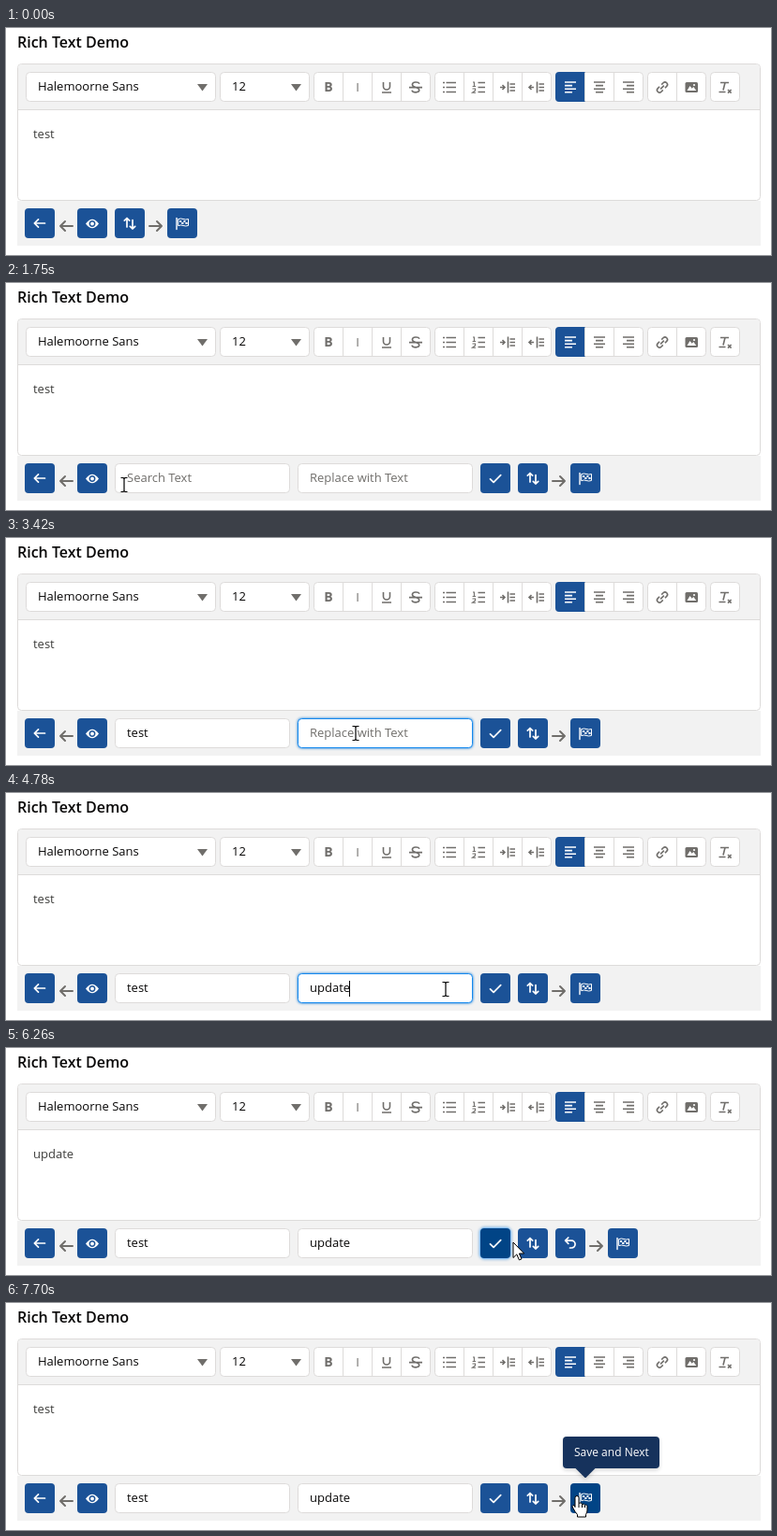
Write an HTML page that moves like this. It is 816 px wide and 243 px high and loops after 8000 ms.

```html
<!DOCTYPE html>
<html lang="en">
<head>
<meta charset="utf-8">
<title>Rich Text Demo</title>
<style>
  html, body { margin: 0; width: 100%; height: 100%; overflow: hidden; background: #fff; }
  svg { display: block; width: 816px; height: 243px; }
  text { font: 13px "Open Sans", sans-serif; fill: #080707; }
  .title { font-size: 16px; font-weight: 600; }
  .body { fill: #3e3e3c; }
  .hint { fill: #706e6b; }
  .tip { font-size: 12px; font-weight: 500; fill: #fff; }
  .native { font-size: 11.35px; fill: #444; }
  .box { fill: #fff; stroke: #dddbda; }
  .rule { fill: none; stroke: #dddbda; }
  .line { fill: none; stroke: #706e6b; stroke-width: 1.6; }
  .solid { fill: #706e6b; }
  .arrow { fill: none; stroke: #706e6b; stroke-width: 2; stroke-linecap: round; stroke-linejoin: round; }
  .icon { fill: none; stroke: #fff; stroke-width: 1.7; stroke-linecap: round; stroke-linejoin: round; }
  .glow { filter: drop-shadow(0 0 1.5px #0070d2); }
  .shade { filter: drop-shadow(0 2px 2px rgba(0, 0, 0, .16)); }
</style>
</head>
<body>
<svg viewBox="0 0 816 243" xmlns="http://www.w3.org/2000/svg">
  <g id="frame"></g>
  <g id="live"></g>
</svg>
<script>
const LOOP = 8000;
const BLUE = '#1b5297', DARK = '#014486', NAVY = '#16325c';

const path = (d, cls, extra = '') => `<path d="${d}" class="${cls}" ${extra}/>`;
const label = (x, y, s, cls = '') => `<text x="${x}" y="${y}" class="${cls}">${s}</text>`;
const rect = (x, y, w, h, r, attrs) =>
  `<rect x="${x}" y="${y}" width="${w}" height="${h}" rx="${r}" ${attrs}/>`;
const move = (x, y, s) => `<g transform="translate(${x} ${y})">${s}</g>`;

// ---- fixed frame and toolbar; tool icons are centred on 0,0 ----
const rows = (ys, x1, x2) => ys.map(y => `M${x1} ${y}H${x2}`).join('');
const aligned = shift => [12, 8, 12, 8].map((w, i) =>
  `M${(w - 12) * shift - 6} ${i * 3.6 - 5}h${w}`).join('');
const indent = head => path(`M-8 .5h5${head}`, 'line', 'stroke-width="1.4"') +
  path('M.5-5.5v12' + rows([-3, .5, 4], 2.5, 8), 'line');
const glyph = (s, style) =>
  `<text y="5" text-anchor="middle" style="fill:#706e6b;${style}">${s}</text>`;

const tools = [
  [328, [
    glyph('B', 'font-weight:700;font-size:14px'),
    glyph('I', 'font:italic 700 15px "Liberation Serif",serif'),
    path('M-3.5-5v4.5a3.5 3.5 0 0 0 7 0v-4.5M-5 6h10', 'line'),
    path('M4-3.2C3-5.8-3.6-5.6-3.6-2.6C-3.6-1-2 0 0 .6C2.5 1.4 3.8 2 3.8 3.6C3.8 6.6-3.4 6.6-4 3.6M-7 .6h14', 'line')
  ]],
  [457, [
    path(rows([-4.5, .5, 5.5], -3.5, 7) + rows([-4.5, .5, 5.5], -7, -5), 'line'),
    path(rows([-4.5, .5, 5.5], -.5, 7), 'line') +
      path('M-6-5h1.4v4.5M-6.4-.5h3.4M-6.5 2h3v2l-3 2.2h3.5', 'line', 'style="stroke-width:1.1"'),
    indent('M-5.5-2l2.5 2.5l-2.5 2.5'),
    indent('M-5.5-2l-2.5 2.5l2.5 2.5')
  ]],
  [586, [
    path(aligned(0), 'line', 'style="stroke:#fff"'),
    path(aligned(-.5), 'line'),
    path(aligned(-1), 'line')
  ]],
  [684, [
    `<g transform="translate(0 .5) rotate(-45)">${path('M-1.5-2.6h-2.6a2.6 2.6 0 0 0 0 5.2h2.6M1.5-2.6h2.6a2.6 2.6 0 0 1 0 5.2h-2.6M-2.6 0h5.2', 'line')}</g>`,
    rect(-6.5, -5, 13.5, 11, 1.5, 'class="solid"') +
      path('M-4.5 4l3-5l2.2 2.8l1.6-1.8l3 4z', '', 'fill="#fff"') +
      '<circle cx="3" cy="-2" r="1.1" fill="#fff"/>'
  ]],
  [751, [
    path('M-5-4.5h9M0-4.5l-2 8M-6.5 5.5h7M3 3l3.6 3.6M6.6 3l-3.6 3.6', 'line')
  ]]
];

function group([x, icons]) {
  const w = icons.length * 31 + 1;
  const cells = icons.map((icon, i) => {
    const left = x + i * 31;
    const split = i ? path(`M${left + .5} 48v30`, 'rule') : '';
    const active = x === 586 && !i
      ? path(`M617.5 47H590a4 4 0 0 0-4 4v24a4 4 0 0 0 4 4h27.5z`, '', `fill="${BLUE}"`) : '';
    return split + active + move(left + 16, 63, icon);
  });
  return rect(x + .5, 47.5, w - 1, 31, 4, 'class="box"') + cells.join('');
}

const picker = (x, w, tx, s) => rect(x + .5, 47.5, w - 1, 31, 4, 'class="box"') +
  label(tx, 67, s) + path(`M${x + w - 20} 60h11l-5.5 7.5z`, 'solid');

document.getElementById('frame').innerHTML =
  label(12, 21, 'Rich Text Demo', 'title') +
  rect(12, 185, 793, 48, 0, 'fill="#f2f2f2"') +
  rect(12.5, 38.5, 792, 146, 4, 'class="box"') +
  path('M13 87V43a4 4 0 0 1 4-4h783a4 4 0 0 1 4 4v44z', '', 'fill="#f2f2f2"') +
  path('M13 87.5h791', 'rule') +
  picker(21, 203, 34, 'Halemoorne Sans') +
  picker(228, 96, 241, '12') +
  tools.map(group).join('');

// ---- timeline ----
// pointer poses: time, x, y; no position means hidden
const poses = [
  [0], [100, 302, 196], [210, 274, 198], [330, 240, 200], [440, 206, 203], [550, 170, 205],
  [660, 136, 205], [770, 107, 205], [880, 100, 204], [1420, 104, 206], [1530, 111, 208],
  [1640, 126, 216], [1760, 138, 220], [1870, 146, 222], [1980, 150, 222], [2210],
  [2650, 373, 214], [2870, 373, 209], [3970], [4780, 469, 210], [4880, 493, 210],
  [4990, 528, 211], [5090, 552, 212], [5190, 556, 212], [5300, 543, 212], [5400, 528, 211],
  [5500, 522, 211], [6160, 532, 209], [6260, 541, 208], [6380, 554, 206], [6500, 560, 205],
  [6700, 581, 206], [6810, 592, 206], [6920, 604, 206], [7030, 609, 207]
];
const tips = [
  [880, 1530, 'eye'], [5190, 5300, 'swap'], [5500, 5730, 'check'],
  [6380, 6700, 'swap'], [7030, 7580, 'undo'], [7700, LOOP, 'flag']
];
const tipText = {
  eye: ['Search and Replace', 133], swap: ['Upper and Lower Case', 153],
  check: ['Replace Text', 96], undo: ['Revert Last Change', 130], flag: ['Save and Next', 103]
};
const searchKeys = [[0, ''], [2210, 't'], [2320, 'te'], [2430, 'tes'], [2540, 'test']];
const replaceKeys = [[0, ''], [3970, 'u'], [4080, 'upd'], [4190, 'upda'], [4290, 'update']];

const last = (list, t) => list.filter(e => e[0] <= t).pop();
const within = (t, a, b) => t >= a && t < b;

// ---- footer parts ----
const icons = {
  back: path('M-5.5 0h11M-1.5-4.2L-5.7 0l4.2 4.2', 'icon'),
  eye: path('M-7 .5Q0-9 7 .5Q0 10-7 .5z', '', 'fill="#fff"') +
    `<circle cy=".5" r="2.7" fill="none" stroke="${BLUE}" stroke-width="1.5"/>`,
  swap: path('M-3 4v-9.5M-5.7-2.8L-3-5.5l2.7 2.7M3-3.5v9.5M.3 3.3L3 6l2.7-2.7', 'icon'),
  check: path('M-5.5.8l3.6 3.6l7.6-7.8', 'icon'),
  undo: path('M-2.2-6L-5.4-2.8l3.2 3.2M-5-2.8H1.2a3.9 3.9 0 0 1 0 7.8H-.5', 'icon'),
  flag: path('M-6-5.5v12', 'icon', 'style="stroke-width:1.4"') +
    path('M-4-4.5q2.5-1 5 0t5.5 0v7q-3 1-5.500 0t-5 0z', 'icon', 'style="stroke-width:1"') +
    path('M-3-3h2.2v2H-3zM1.400-3h2v2h-2zM-.8-1h2.200v2h-2.200zM3.400-1h2.200v2H3.400z', '', 'fill="#fff"')
};

const pen = document.createElement('canvas').getContext('2d');
function textWidth(s) {
  pen.font = '13px "Open Sans", sans-serif';
  return pen.measureText(s).width;
}

function button({ id, x }, hover, focus) {
  const ring = focus ? rect(x - .5, 192.5, 33, 33, 4.5, 'class="glow" fill="none" stroke="#8fc3f5"') : '';
  return ring + rect(x, 193, 32, 32, 4, `fill="${hover || focus ? DARK : BLUE}"`) +
    move(x + 16, 209, icons[id]);
}

function field(x, value, hint, focus, caret) {
  const at = Math.round(x + 13 + textWidth(value)) - .5;
  return rect(x + .5, 193.5, 186, 31, 4, focus ? 'class="glow" fill="#fff" stroke="#1589ee"' : 'class="box"') +
    label(x + 13, 213, value || hint, value ? '' : 'hint') +
    (caret ? path(`M${at} 201v17`, '', 'stroke="#000"') : '');
}

function bubble(x, id) {
  const [s, w] = tipText[id];
  return `<g class="shade" fill="${NAVY}">${rect(x - 24, 143, w, 34, 4, '')}
    <path d="M${x - 11} 176.500l10 10q1 1 2 0l10-10z"/></g>` + label(x - 12, 164, s, 'tip');
}

const native = (x, y, w, s) =>
  rect(x + .5, y + .5, w - 1, 24, 0, 'fill="#fff" stroke="#555"') + label(x + 8, y + 17, s, 'native');

const pointers = {
  arrow: path('M0 0v16.500l3.800-3.600l2.600 6l2.600-1.100l-2.600-5.800h5.300z', '', 'fill="#fff" stroke="#000"'),
  beam: path('M-3.500-7.500h2.500l1 1l1-1h2.500M0-6.500v13M-3.500 7.500h2.500l1-1l1 1h2.500', '',
    'fill="none" stroke="#000" stroke-width="1.200"'),
  hand: path('M-2 1.500a2 2 0 0 1 4 0V7.500a2 1.600 0 0 1 3.500 1a2 1.600 0 0 1 3 .8a1.600 1.600 0 0 1 2.500 1.400V15q0 2-1.500 4.500V22h-9v-2.500q-2-2-5-7.500q-1-2 .5-2.600q1-.4 2 2.100z',
    '', 'fill="#fff" stroke="#000" stroke-linejoin="round"') +
    path('M2 7.500V12M5.500 8.500V12M8.500 9.300V12', '', 'stroke="#000"')
};

function scene(t) {
  const open = t >= 1310;
  const undo = within(t, 5830, 7580);
  const [, px, py] = last(poses, t);
  const over = (x, w) => px >= x && px < x + w && py >= 193 && py < 225;

  const base = open ? 546 : 116;
  const end = base + (undo ? 96 : 56);
  const buttons = [{ id: 'back', x: 20 }, { id: 'eye', x: 76 }, { id: 'swap', x: base }, { id: 'flag', x: end }];
  if (open) buttons.push({ id: 'check', x: 506 });
  if (undo) buttons.push({ id: 'undo', x: 586 });

  const hovered = buttons.find(b => over(b.x, 32));
  const checkFocus = within(t, 5730, 7580);
  const searchFocus = within(t, 2090, 2990);
  const replaceFocus = within(t, 2990, 5730);
  const caretOff = within(t, 3420, 3970) || within(t, 4880, 5400);

  let out = label(29, 118, within(t, 5730, 7580) ? 'update' : 'test', 'body');
  out += path('M58 212h13M63 207l-5 5l5 5', 'arrow');
  out += path(`M${end - 19} 212h13m-5-5l5 5l-5 5`, 'arrow');
  if (open) {
    out += field(116, last(searchKeys, t)[1], 'Search Text', searchFocus, searchFocus);
    out += field(311, last(replaceKeys, t)[1], 'Replace with Text', replaceFocus, replaceFocus && !caretOff);
  }
  out += buttons.map(b => button(b, b === hovered, b.id === 'check' && checkFocus)).join('');

  const tip = tips.find(([a, b]) => within(t, a, b));
  if (tip) out += bubble(buttons.find(b => b.id === tip[2]).x + 16, tip[2]);
  if (within(t, 1090, 1310)) out += native(108, 218, 119, tipText.eye[0]);
  if (within(t, 7360, 7580)) out += native(617, 221, 118, tipText.undo[0]);

  if (px) {
    const onField = open && (over(116, 187) || over(311, 187));
    out += move(px, py, pointers[hovered ? 'hand' : onField ? 'beam' : 'arrow']);
  }
  return out;
}

const live = document.getElementById('live');
let shown = '';
function draw() {
  const markup = scene(performance.now() % LOOP);
  if (markup !== shown) live.innerHTML = shown = markup;
  requestAnimationFrame(draw);
}
draw();
</script>
</body>
</html>
```
